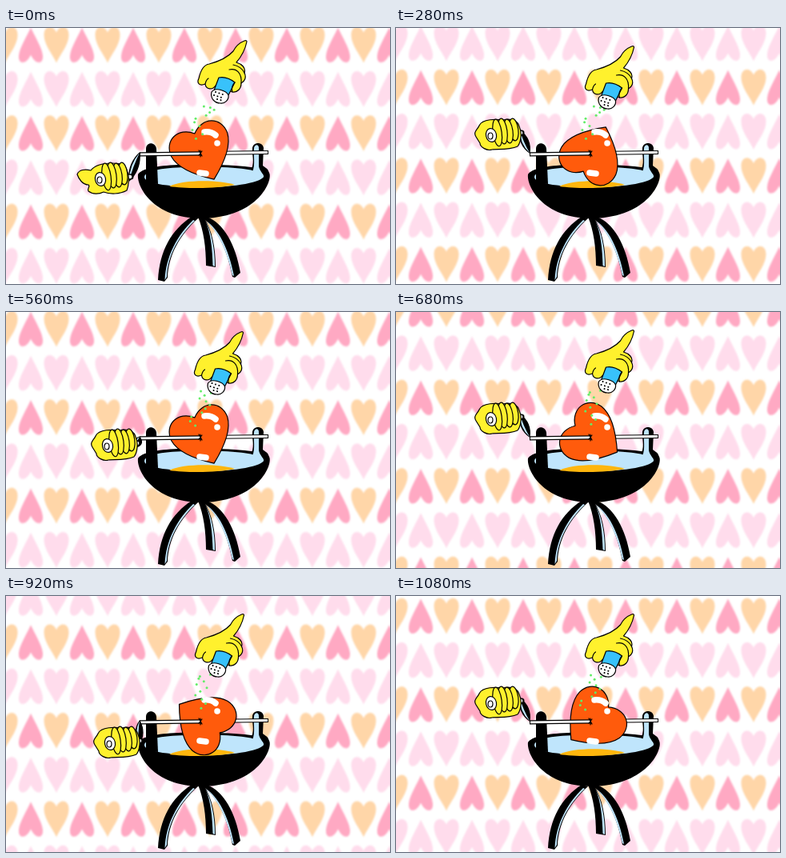
Write an HTML page that moves like this. It is 480x320 px and loops after 1.12 s.

```html
<!DOCTYPE html>
<html lang="en">
<head>
<meta charset="utf-8">
<title>Heart on a spit</title>
<style>
html, body { margin: 0; width: 100%; height: 100%; overflow: hidden; background: #fff; }
svg { display: block; width: 480px; height: 320px; }
.ink { stroke: #000; stroke-width: 1.2; stroke-linejoin: round; stroke-linecap: round; }
.glove { fill: #fff12d; }
.steel { fill: #bfe5fc; }
.white { fill: #fff; }
.line { fill: none; }
</style>
</head>
<body>
<svg viewBox="0 0 480 320">
  <defs>
    <path id="down" d="M0 23C-5 12-15 1-15.500-11C-16-24-4-25 0-15C4-25 16-24 15.500-11C15 1 5 12 0 23Z"/>
    <path id="up" d="M0-21C5-10 14 4 15 14C16 26 5 25 0 13C-5 25-16 26-15 14C-14 4-5-10 0-21Z"/>
    <filter id="soft" filterUnits="userSpaceOnUse" x="-40" y="-160" width="560" height="640">
      <feGaussianBlur stdDeviation="1.3"/>
    </filter>
  </defs>
  <g id="wall"><g id="hearts" filter="url(#soft)"></g></g>

  <g id="grill">
    <path d="M240 236C247 253 250 274 250 297L262 299C262 275 258 253 247 236Z"/>
    <path class="steel" d="M249 240C256 256 258 277 258.500 297L261 298C261 275 257 256 249 240Z"/>
    <path d="M232 236C207 252 192 278 190 315L198 317L202 312C203 284 217 259 240 238Z"/>
    <path class="steel" d="M234 240C214 259 200 285 198.500 315L201 311C202 284 216 260 236 241Z"/>
    <path d="M244 236C262 249 276 273 283 311L286 312L293 306C287 270 272 244 251 236Z"/>
    <path class="steel" d="M250 241C265 251 278 274 285 310L283 309C276 276 264 254 250 241Z"/>
    <path d="M165 183C169 176 188 172 215 171C255 169 325 172 329 181C334 190 316 236 247 238C184 239 163 198 165 183Z"/>
    <path class="steel" d="M173 186C174 178 199 174 230 174C274 172 321 177 323 184C322 193 286 199 247 199C210 199 172 195 173 186Z"/>
    <path d="M204 198C222 189 268 190 286 196C264 201 226 201 204 198Z" fill="#ffb60d"/>
    <path d="M307 176C311 166 307 158 308 150C309 142 321 142 322 150L321 172C324 175 328 175 329 182L322 190C324 181 318 179 307 178Z"/>
    <path class="steel" d="M308 180C312 171 309 158 310 150C311 145 316 145 316 150L316 173C317 179 322 181 321 187Z"/>
  </g>
  <path d="M244 156.500L328 155.500" stroke="#000" stroke-width="5.200"/>
  <path d="M244 156.500L327 155.500" stroke="#fff" stroke-width="2.800"/>

  <path id="roast" class="ink" fill="#ff5b0c" d="M36 0C26 14 8 36-11 38C-33 39-42 16-26 0C-42-16-33-39-11-38C8-36 26-14 36 0Z"/>
  <g stroke="#fff" stroke-width="7.500" stroke-linecap="round" class="line">
    <path d="M248 130Q256 129 262 134M264 144h.1M242 181L250 182"/>
  </g>

  <path d="M175 194V151C175 142 187 142 188 151L190 195Z"/>
  <path d="M167 157.800L244 156.800" stroke="#000" stroke-width="5.200"/>
  <path d="M168 157.800L243 156.800" stroke="#fff" stroke-width="2.800"/>
  <path class="ink line" d="M241 153L245 160M245 154L241 159M243 153V161"/>

  <path id="arm" class="ink"/>
  <path id="armFace" class="steel"/>
  <g id="fist" class="ink">
    <path d="M28-3H38" stroke-width="7"/>
    <path d="M28-3H37" stroke="#fff" stroke-width="4.600"/>
    <path id="glove" class="glove"/>
    <g id="fingers"></g>
    <ellipse class="white" rx="6.500" ry="8.500" transform="rotate(-12)"/>
    <ellipse class="white" cx="-1" cy="1" rx="3" ry="4"/>
  </g>

  <g id="salt" fill="#63ed68"></g>

  <g id="shaker" class="ink">
    <path class="glove" d="M301 17C299 27 294 36 288 43C295 45 300 50 298 56C301 62 298 67 294 69C294 76 289 81 283 80L262 72C258 78 250 77 249 70C242 73 238 69 241 63C243 54 247 46 254 45C265 42 277 37 284 29C288 21 293 18 298 16Q301 15 301 17Z"/>
    <path fill="#38c2fb" d="M266 62Q276 60 286 68L278 84L260 78Z"/>
    <path class="white" d="M257 80C262 73 276 79 278 84C279 90 273 95 268 94C261 94 255 88 257 80Z"/>
    <path class="line" d="M249 70Q250 65 253 63M279 52C288 50 295 56 294 69M284 46Q294 48 298 56M286 68Q281 73 283 80"/>
    <path class="line" d="M260 84L273 88M262 80L274 84M264 89L272 91" stroke-width="2" stroke-dasharray=".1 4.500" style="stroke-width:2"/>
  </g>
</svg>
<script>
const $ = id => document.getElementById(id);
const STEP = 40, FRAMES = 28, ROW = 55.25, SCROLL = 8.2;
const AXLE = [167, 156];

// Key poses, each held for two steps.
const roastAngles = [67, 32, -3, -63, -145, -180, -221];
const knobs = [[118, 189], [130, 184], [127, 167], [119, 134], [117, 162]];
const dips = [0, 7, 9, 7, 9];

const pointedGlove = 'M-29-6C-27-12-19-13-12-11C-6-19 6-20 15-20C24-20 32-18 33-11C37-3 35 9 33 14C24 19 12 19 4 16C-2 19-10 19-15 15C-17 11-12 9-15 7C-22 7-27 0-29-6Z';
const roundGlove = 'M-19 2C-23-4-17-7-15-12C-11-21 7-20 15-19C25-22 34-17 35-11C39-3 37 9 33 14C22 19 7 17 1 18C-5 20-14 15-14 10Z';

const range = (count, make) => Array.from({ length: count }, (_, i) => make(i)).join('');
const set = (id, name, value) => $(id).setAttribute(name, value);

function random(seed) {
  const v = Math.sin(seed * 127.1 + 3.7) * 43758.5453;
  return v - Math.floor(v);
}

function wallRow(row) {
  return range(16, col => {
    const up = col % 2;
    const color = row % 2 ? '#ffdcec' : up ? '#ffa9c3' : '#ffd6a8';
    return `<use href="#${up ? 'up' : 'down'}" x="${col * 32 - 1}" y="${(row - 2) * ROW}" fill="${color}"/>`;
  });
}

const finger = i =>
  `<ellipse class="glove" cx="${29 - i * 7}" cy="${i % 2 - 3}" rx="5.500" ry="${14 + i}" transform="rotate(-8)"/>`;

// A lens between two points, bulging by the given widths on either side.
function lens([x1, y1], [x2, y2], left, right) {
  const length = Math.hypot(x2 - x1, y2 - y1);
  const nx = (y1 - y2) / length, ny = (x2 - x1) / length;
  const mx = (x1 + x2) / 2, my = (y1 + y2) / 2;
  const bulge = w => `Q${mx + nx * w} ${my + ny * w}`;
  return `M${x1} ${y1}${bulge(left)} ${x2} ${y2}${bulge(right)} ${x1} ${y1}Z`;
}

function grain(i, step) {
  const fall = (i / 11 + step / 3) % 1;
  const x = 256 - 16 * fall + (random(i) - 0.5) * 24;
  return `<circle cx="${x}" cy="${98 + 46 * fall ** 1.4}" r="1.5"/>`;
}

function drawCrank(pose) {
  const [x, y] = knobs[pose];
  const grip = [x + 36, y + (y < AXLE[1] ? -6 : 2)];
  const side = y < AXLE[1] ? -1 : 1;
  set('arm', 'd', lens(AXLE, grip, 9, -9));
  set('armFace', 'd', lens(AXLE, grip, 7 * side, 2 * side));
  set('fist', 'transform', `translate(${x} ${y})`);
  set('glove', 'd', pose % 4 ? roundGlove : pointedGlove);
}

let shown = -1;
function draw(time) {
  const n = Math.floor(time / STEP) % FRAMES;
  if (n === shown) return;
  shown = n;
  const pose = n >> 1, dip = dips[pose % 5];
  set('wall', 'transform', `translate(0 ${20.5 - SCROLL * (n % 14)})`);
  set('roast', 'transform', `translate(246 156) rotate(${roastAngles[pose % 7]})`);
  set('shaker', 'transform', `translate(${-dip / 2} ${dip})`);
  drawCrank(pose % 5);
  $('salt').innerHTML = range(11, i => grain(i, pose % 3));
}

$('hearts').innerHTML = range(10, wallRow);
$('fingers').innerHTML = range(4, finger);
const begin = performance.now();
function tick() {
  draw(performance.now() - begin);
  requestAnimationFrame(tick);
}
tick();
</script>
</body>
</html>
```
